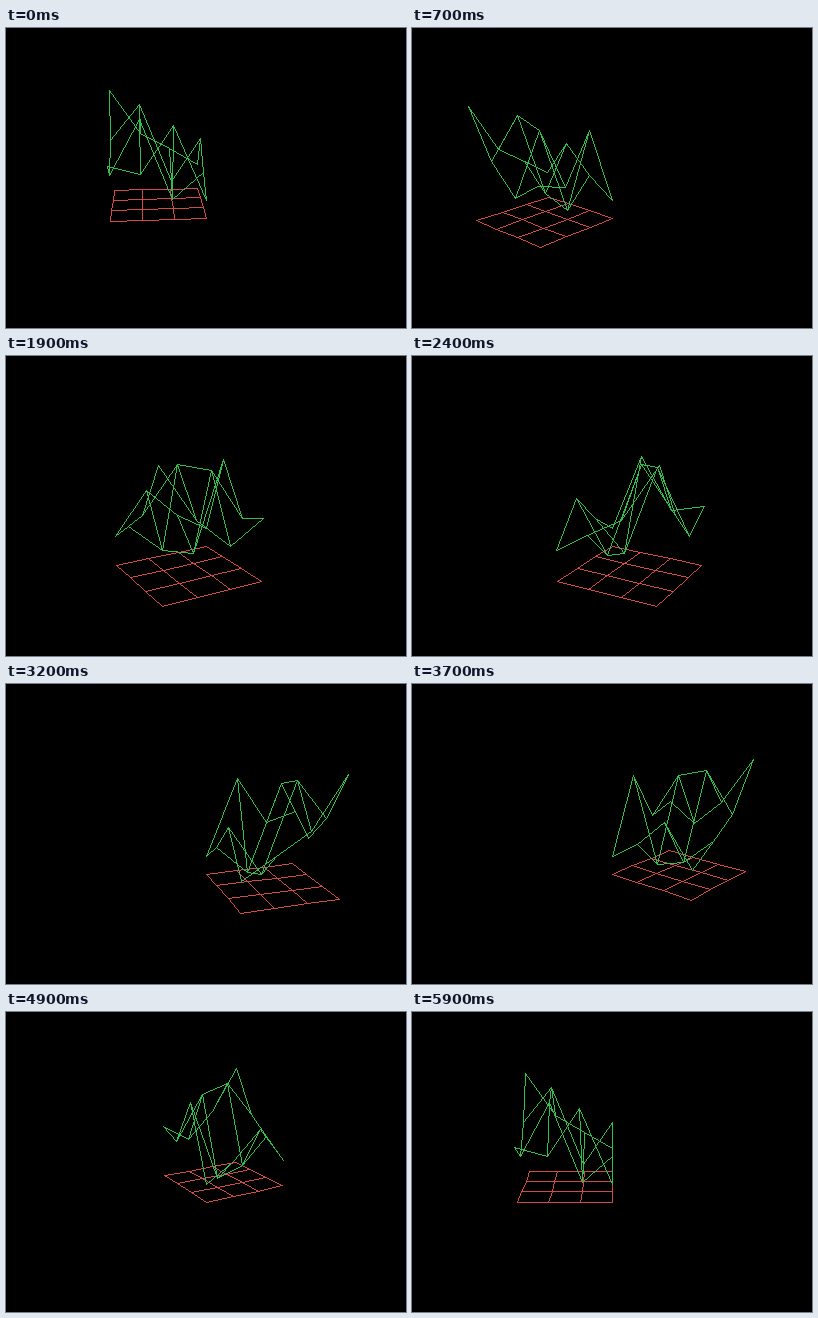
An HTML page with a canvas for the animation above (6 s loop, 400 px wide and 300 px high).

```html
<!DOCTYPE html>
<html lang="en">
<head>
<meta charset="utf-8">
<title>Rotating wireframe terrain</title>
<style>
  html, body { margin: 0; width: 100%; height: 100%; overflow: hidden; background: #000; }
  canvas { display: block; image-rendering: pixelated; }
</style>
</head>
<body>
<canvas id="stage" width="400" height="300"></canvas>
<script>
const ctx = document.getElementById('stage').getContext('2d');

const STEP_MS = 100, STEPS = 60;
const RED = '#d24b46', GREEN = '#32be4b';

// Terrain heights in units of the grid side; the first value sits on the pivot.
const HEIGHTS = [
  [0.2, 1.0, 0.5, 0.6],
  [0.4, 0.1, 1.0, 0.4],
  [0.7, 0.2, 1.1, 0.7],
  [0.3, 0.5, 0.7, 1.2]
];
const N = HEIGHTS.length;

// Perspective camera pitched down towards the pivot.
function project(x, y, z) {
  const w = 1 + 0.155 * z - 0.047 * y;
  return [
    Math.floor(200.35 + 95.2 * x / w),
    Math.floor(190.17 - (34.9 * z + 88.95 * y) / w)
  ];
}

// Bresenham line without antialiasing.
function line([x, y], [x1, y1]) {
  const dx = Math.abs(x1 - x), dy = -Math.abs(y1 - y);
  const sx = x < x1 ? 1 : -1, sy = y < y1 ? 1 : -1;
  let err = dx + dy;
  for (;;) {
    ctx.fillRect(x, y, 1, 1);
    if (x === x1 && y === y1) return;
    const e2 = 2 * err;
    if (e2 >= dy) { err += dy; x += sx; }
    if (e2 <= dx) { err += dx; y += sy; }
  }
}

function mesh(angle, color, height) {
  const s = Math.sin(angle), c = Math.cos(angle);
  const pts = HEIGHTS.map((row, i) => row.map((h, j) => {
    const u = i / (N - 1), v = j / (N - 1);
    return project(-u * s - v * c, h * height, u * c - v * s);
  }));
  ctx.fillStyle = color;
  for (let i = 0; i < N; i++) {
    for (let j = 0; j < N; j++) {
      if (i + 1 < N) line(pts[i][j], pts[i + 1][j]);
      if (j + 1 < N) line(pts[i][j], pts[i][j + 1]);
    }
  }
}

function draw() {
  const step = Math.floor(performance.now() / STEP_MS) % STEPS;
  const angle = (step + 1) * 2 * Math.PI / STEPS;
  ctx.fillStyle = '#000';
  ctx.fillRect(0, 0, 400, 300);
  mesh(angle, RED, 0);
  mesh(angle, GREEN, 1);
  requestAnimationFrame(draw);
}
draw();
</script>
</body>
</html>
```
